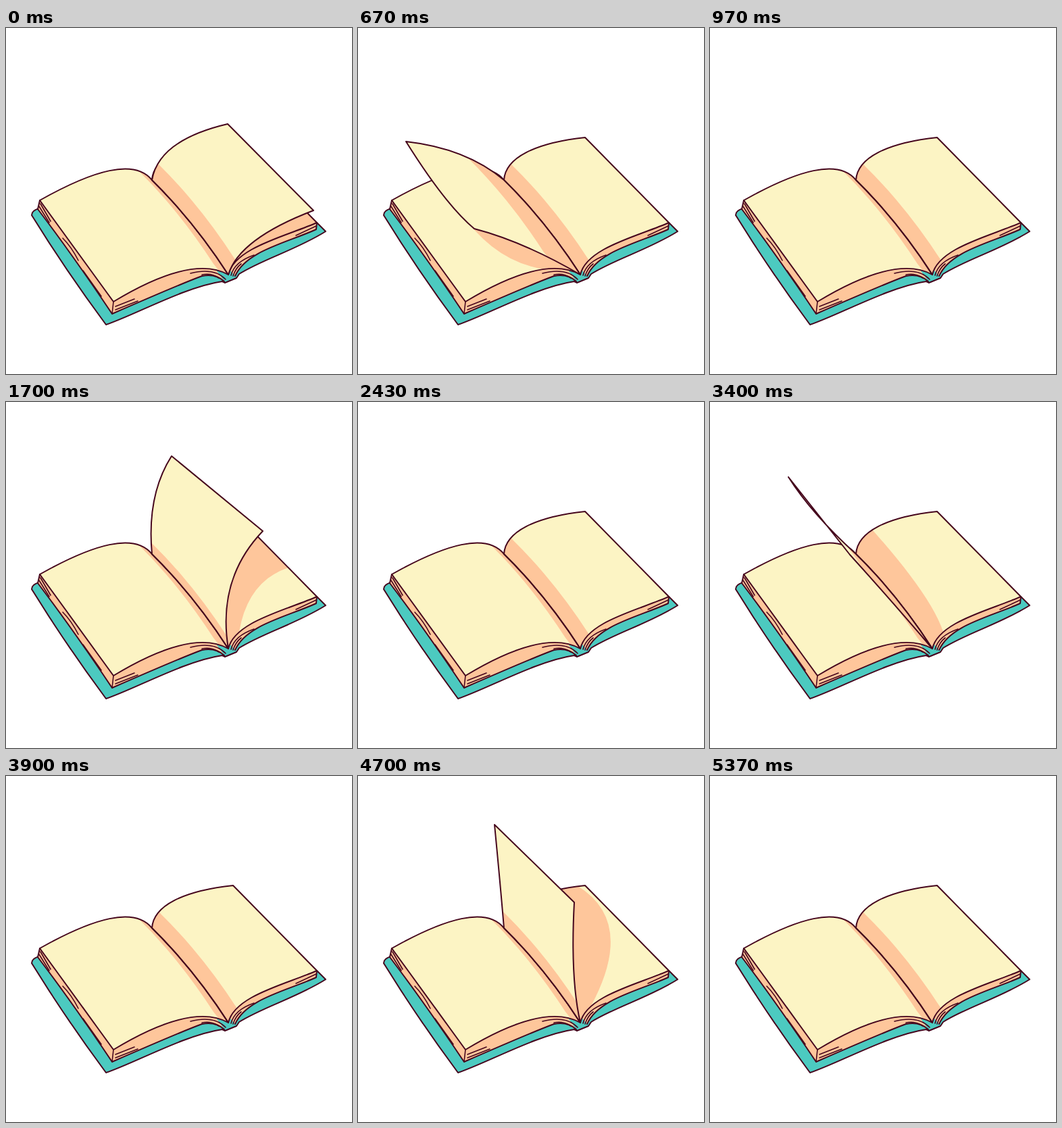
Recreate the animation shown at these times as an HTML page. Size 512x512 px, loop 5830 ms.

```html
<!DOCTYPE html>
<html lang="en">
<head>
<meta charset="utf-8">
<title>Turning pages</title>
<style>
  html, body { margin: 0; width: 100%; height: 100%; overflow: hidden; background: #fff; }
  svg { display: block; width: 100%; height: 100%; }
  path { stroke-linecap: round; stroke-linejoin: round; }
  .ink { fill: none; stroke: #45061d; stroke-width: 2; }
  .thin { stroke-width: 1.6; }
  .cream { fill: #fcf4c4; }
  .peach { fill: #fec69b; }
  .teal { fill: #4ccac0; }
</style>
</head>
<body>
<svg viewBox="0 0 512 512">
  <defs>
    <clipPath id="leftClip"><path id="leftArea"/></clipPath>
    <clipPath id="rightClip"><path id="rightArea"/></clipPath>
    <clipPath id="leafClip"><path id="leafArea"/></clipPath>
  </defs>
  <g id="book"></g>
  <g id="leaf"></g>
</svg>
<script>
const $ = id => document.getElementById(id);
const LOOP = 5830, FPS = 30, TURN_FRAMES = 44, FRAMES_PER_POSE = 2.43, LAST_POSE = 12;

// The spine runs from HINGE (far end) to BASE (near end).
const HINGE = [216, 225], BASE = [329, 365], BOW = [278, 286];
const along = [BASE[0] - HINGE[0], BASE[1] - HINGE[1]];
const SPINE_BACK = `Q${BOW} ${HINGE}`;

const COVER = 'M49 267Q38 270 38 277Q88 358 148 439C190 425 265 383 320 375' +
  'L324 377L341 370L345 364C380 342 430 328 473 301L460 288';
const LEFT_BLOCK = 'M50 255L47 268Q98 335 157 423C205 402 260 378 290 367Q310 363 323 375';
const RIGHT_BLOCK = 'M460 288L459 298C415 318 355 330 339 367';
const LEFT_PAGE = `M${HINGE}C190 193 130 210 50 255L159 405C225 365 288 342 ${BASE}${SPINE_BACK}Z`;
const RIGHT_PAGE = `M${HINGE}C218 192 262 170 336 162L460 288C415 308 338 325 ${BASE}${SPINE_BACK}Z`;
const DETAILS = 'M51 260L66 286M49 264L64 288M84 311Q97 324 107 344M114 359L141 397' +
  'M159 405L157 423M162 412L190 401M162 417L195 404M273 363Q308 354 325 372M290 365Q304 362 315 370' +
  'M333 366Q338 346 367 336M336 367Q340 355 348 349M429 307L459 293';

// Key poses: time, shade width, sag of the outer edge, then points:
// far bend, far tip, near tip, near bend, shadow start, shadow bend.
const KEYS = [
  [0, .22, 0, 226, 166, 328, 142, 455, 270, 345, 312, 500, 240, 420, 360],
  [3, .1, 0, 208, 138, 245, 80, 380, 191, 312, 262, 418, 245, 358, 265],
  [4, .2, 0, 211, 165, 202, 72, 320, 187, 314, 300, 300, 150, 420, 200],
  [6, 1, 0, 150, 165, 116, 111, 207, 226, 265, 290, 232, 180, 327, 285],
  [8, .43, 1, 160, 178, 71, 168, 172, 297, 245, 316, 150, 270, 200, 345],
  [12, .17, 0, 150, 185, 50, 255, 159, 405, 285, 335, 90, 300, 180, 390]
];

const lerp = (a, b, u) => a.map((v, i) => v + (b[i] - v) * u);
const shift = (p, v, k = 1) => [p[0] + v[0] * k, p[1] + v[1] * k];
const quad = (a, b, c, u) => lerp(lerp(a, b, u), lerp(b, c, u), u);

// Band between the spine and a copy of it moved to start at p.
function band(p) {
  const move = [p[0] - HINGE[0], p[1] - HINGE[1]];
  const end = shift(BASE, move);
  return `M${shift(p, along, -.15)}L${p}Q${shift(BOW, move)} ${end}L${shift(end, along, .15)}` +
    `L${shift(BASE, along, .15)}L${BASE}${SPINE_BACK}L${shift(HINGE, along, -.15)}Z`;
}

function add(parent, cls, d = '', clip) {
  const el = document.createElementNS('http://www.w3.org/2000/svg', 'path');
  el.setAttribute('class', cls);
  el.setAttribute('d', d);
  if (clip) el.setAttribute('clip-path', `url(#${clip})`);
  $(parent).append(el);
  return el;
}

$('leftArea').setAttribute('d', LEFT_PAGE);
$('rightArea').setAttribute('d', RIGHT_PAGE);
for (const [cls, d] of [['teal', COVER], ['peach', LEFT_BLOCK], ['peach', RIGHT_BLOCK]]) {
  add('book', cls, `${d}L${HINGE}Z`);
  add('book', 'ink', d);
}
add('book', 'cream', LEFT_PAGE);
add('book', 'cream', RIGHT_PAGE);
add('book', 'peach', band([194, 209]), 'leftClip');
add('book', 'peach', band([229, 204]), 'rightClip');
const shadow = add('book', 'peach');
add('book', 'ink', LEFT_PAGE);
add('book', 'ink', RIGHT_PAGE);
add('book', 'ink thin', DETAILS);

const leafFill = add('leaf', 'cream');
const leafShade = add('leaf', 'peach', '', 'leafClip');
const leafInk = add('leaf', 'ink');

function poseAt(t) {
  const frame = Math.floor(t * FPS / 1000 + .15) % TURN_FRAMES;
  return Math.min(LAST_POSE, Math.floor((frame + .8) / FRAMES_PER_POSE));
}

function drawLeaf(n) {
  const i = KEYS.findIndex(k => k[0] > n);
  const a = KEYS[i - 1], b = KEYS[i];
  const [, width, sag, ...xy] = lerp(a, b, (n - a[0]) / (b[0] - a[0]));
  const [farBend, far, near, nearBend, start, bend] =
    [0, 2, 4, 6, 8, 10].map(k => xy.slice(k, k + 2));

  const edgeBend = shift(lerp(far, near, .5), [8, 29], sag);
  const body = `M${HINGE}Q${farBend} ${far}Q${edgeBend} ${near}Q${nearBend} ${BASE}${SPINE_BACK}Z`;
  for (const el of [leafFill, leafInk, $('leafArea')]) el.setAttribute('d', body);
  leafShade.setAttribute('d', band(quad(HINGE, farBend, far, width)));

  const onLeft = n > 6;
  const end = onLeft ? [275, 357] : [345, 340];
  const top = shift(lerp(HINGE, start, .5), [0, -90]);
  shadow.setAttribute('d', `M${top}L${start}Q${bend} ${end}L${BASE}${SPINE_BACK}Z`);
  shadow.setAttribute('clip-path', onLeft ? 'url(#leftClip)' : 'url(#rightClip)');
}

let shown = -1;
function draw(t) {
  const n = poseAt(t);
  if (n === shown) return;
  shown = n;
  const turning = n < LAST_POSE;
  $('leaf').style.display = shadow.style.display = turning ? '' : 'none';
  if (turning) drawLeaf(n);
}

const begin = performance.now();
function tick() {
  draw((performance.now() - begin) % LOOP);
  requestAnimationFrame(tick);
}
tick();
</script>
</body>
</html>
```
